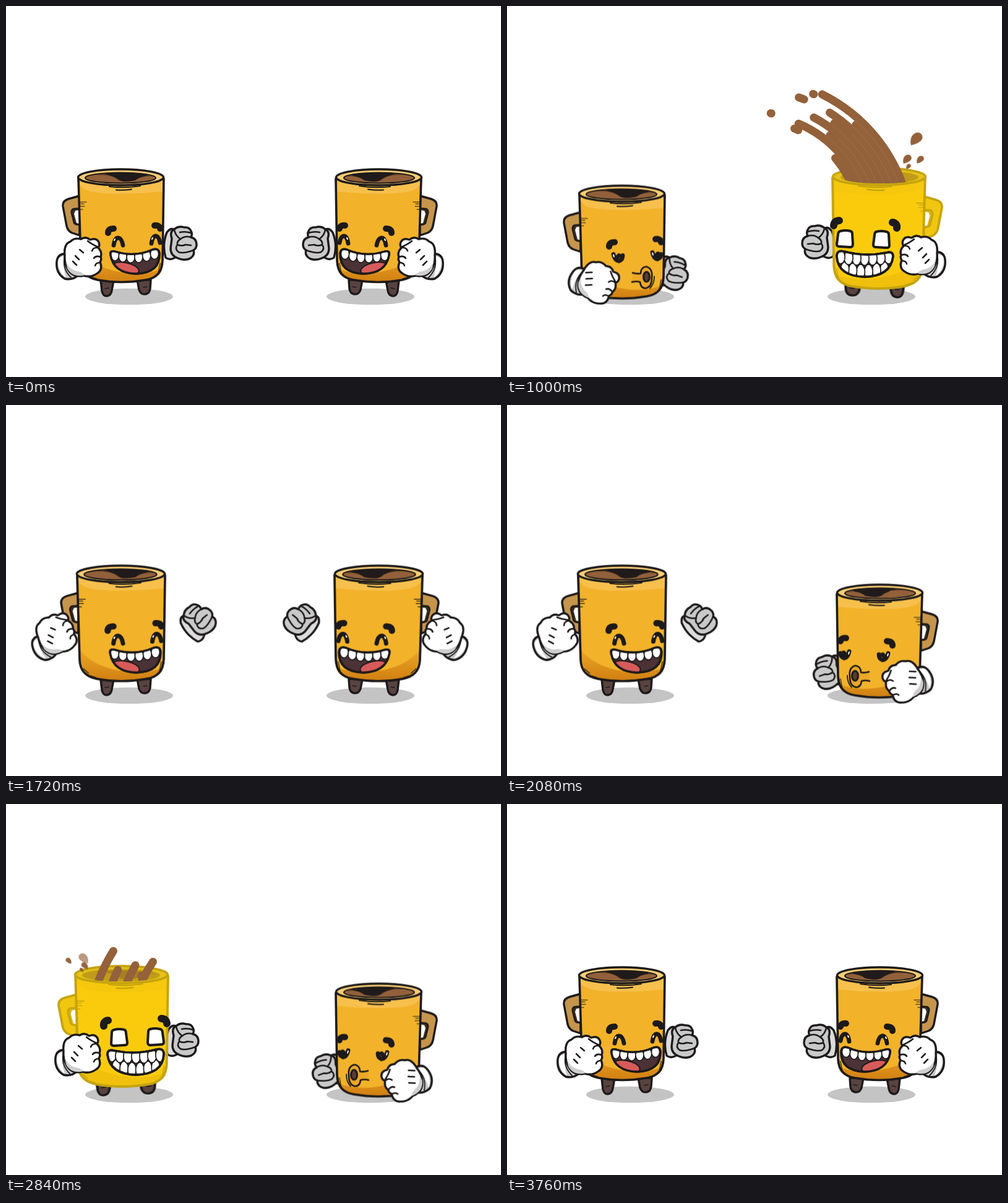
Recreate the animation shown at these times as an HTML page. Size 800 by 600 pixels, loop 3.8 s.

```html
<!DOCTYPE html>
<html lang="en">
<head>
<meta charset="utf-8">
<title>Coffee toss</title>
<style>
html, body { margin: 0; width: 100%; height: 100%; overflow: hidden; background: #fff; }
svg { display: block; width: 800px; height: 600px; }
path, ellipse { stroke-linecap: round; stroke-linejoin: round; }
g, .drop, .strand { animation: 3800ms linear infinite; }
.pose { animation-timing-function: ease-in-out; }
.flip { animation-timing-function: step-end; }
.body { transform-origin: 186px 447px; }
.front { transform-origin: 122px 407px; }
.back { transform-origin: 284px 384px; }
.legs { transform-origin: 193px 447px; }
.ink { fill: none; stroke: #1d1a1b; }
.out { stroke: #1d1a1b; stroke-width: 3.4; }
.strand { fill: none; stroke: #93613a; stroke-width: 13; }
.thin { stroke: #a37450; stroke-width: 1.2; stroke-opacity: .6; }
.drop { fill: #93613a; }
</style>
</head>
<body>
<svg id="stage" viewBox="0 0 800 600"></svg>
<script>
const LOOP = 3800, SHIFT = -2100;
const laughShape = 'M169 403Q167 395 176 397Q208 407 237 394Q247 391 248 400Q249 432 210 433Q174 432 169 403Z';
const grinShape = 'M164 405Q164 396 175 399Q210 406 243 397Q255 394 255 405Q253 437 210 438Q168 437 164 405Z';
const bodyShape = 'M117 279L121 413Q122 438 148 443Q186 450 226 443Q252 439 253 412L255 279Z';
const rules = [];

const each = (n, fn) => Array.from({ length: n }, (_, i) => fn(i)).join('');
const ink = (d, w = 2.5) => `<path class="ink" d="${d}" stroke-width="${w}"/>`;
const fill = (d, color) => `<path d="${d}" fill="${color}"/>`;
const shape = (d, color) => `<path class="out" d="${d}" fill="${color}"/>`;

// Times are in ms; the first and last values are held to the loop ends.
function key(name, frames) {
  const last = frames[frames.length - 1];
  const all = [[0, frames[0][1]], ...frames, [LOOP, last[1]]];
  rules.push(`@keyframes ${name}{${all.map(([t, css]) => `${t / LOOP * 100}%{${css}}`).join('')}}`);
}

// Switches a part to "shown" during the spans and to the reverse between them.
function flip(name, spans, shown) {
  const vis = on => `visibility:${on ? 'visible' : 'hidden'}`;
  key(name, [[0, vis(!shown)], ...spans.flatMap(([a, b]) => [[a, vis(shown)], [b, vis(!shown)]])]);
}

// body: x, y, scale x, scale y; hands: x, y, angle; legs: spread, y
const poses = {
  rest: { body: [0, 0, 1, 1],          front: [0, 0, 0],       back: [0, 0, 0],      legs: [1, 0] },
  lift: { body: [0, 0, 1.01, 1.005],   front: [-5, -5, -3],    back: [5, -3, -3],    legs: [1, 0] },
  up:   { body: [0, 0, 1.03, 1.023],   front: [-43, -35, -17], back: [28, -36, -45], legs: [1, 0] },
  kiss: { body: [0, 26.5, 1, 1],       front: [22, 39, 34],    back: [-15, 48, 14],  legs: [1, 0] },
  gulp: { body: [1, 10.5, 1.085, 1.068], front: [-2, -3, 0],   back: [3, -2, 0],     legs: [1.18, 2] }
};

const sides = {
  L: {
    track: [[0, 'rest'], [180, 'up'], [240, 'up'], [350, 'kiss'], [1440, 'kiss'], [1720, 'up'],
      [2180, 'up'], [2420, 'rest'], [2480, 'rest'], [2550, 'gulp'], [2860, 'gulp'], [2960, 'rest']],
    kiss: [310, 1500], shock: [2480, 3150], grin: [2490, 2920]
  },
  R: {
    track: [[240, 'rest'], [460, 'lift'], [620, 'lift'], [780, 'rest'], [850, 'gulp'], [1150, 'gulp'],
      [1260, 'rest'], [1460, 'rest'], [1700, 'up'], [1900, 'up'], [2040, 'kiss'], [3140, 'kiss'],
      [3360, 'up'], [3440, 'up'], [3700, 'rest']],
    kiss: [2000, 3200], shock: [790, 1460], grin: [790, 1220]
  }
};

function skin(c) {
  return `<path d="M119 307L101 312Q91 315 92 324L98 356Q100 364 107 367L119 371Z" fill="${c.tan}" stroke="${c.line}" stroke-width="3.4"/>
    <path d="M120 327L109 328Q105 330 106 335L110 351Q112 354 120 354Z" fill="${c.inner}" stroke="${c.line}" stroke-width="2.6"/>
    ${fill('M119 330L112 331L110 336L114 351L119 352Z', '#fff')}
    ${fill(bodyShape, c.body)}
    ${fill('M118 283Q118 299 150 302Q190 306 254 300L255 283Z', c.light)}
    ${fill('M122 398Q145 425 190 431Q225 436 252 425Q250 440 226 443Q186 450 148 443Q122 438 122 398Z', c.shade)}
    <path d="${bodyShape}" fill="none" stroke="${c.line}" stroke-width="3.6"/>
    <path d="M119 317h11M119 320h7M119 324h8M119 329h5M127 427l8 7M129 433l9 6M138 438l9 3M252 412l-3 16M249 416l-3 16"
      fill="none" stroke="${c.line}" stroke-width="1.2"/>
    <ellipse cx="185.5" cy="277" rx="69" ry="13" fill="${c.rim}" stroke="${c.line}" stroke-width="3.4"/>
    <ellipse cx="185" cy="278" rx="57" ry="8.5" fill="${c.coffee}"/>
    ${fill('M140 273Q155 269 185 269.5Q222 269 237 276Q220 274 207 282Q185 287 178 279Q168 272 140 273Z', c.dark)}
    ${fill('M158 272Q185 267 222 271Q236 272 226 275Q215 277 209 282Q188 287 181 280Q172 274 158 272Z', c.deep)}
    <ellipse cx="185" cy="278" rx="57" ry="8.5" fill="none" stroke="${c.line}" stroke-width="2.2"/>
    <path d="M167 292Q192 295 217 291M178 297.5Q190 298.5 203 296.5" fill="none" stroke="${c.line}" stroke-width="2"/>`;
}

const orange = { line: '#1d1a1b', body: '#f2b22a', light: '#f7c04c', shade: 'url(#dim)', rim: '#f8cd74',
  tan: '#c5954c', inner: '#3a2c22', coffee: '#92603a', dark: '#6b432a', deep: '#201b1a' };
const yellow = { line: '#c4a30f', body: '#facb0d', light: '#f5c80d', shade: '#f0c00c', rim: '#e6c21a',
  tan: '#f1c60f', inner: '#d9b310', coffee: '#c09a1c', dark: '#b08a1c', deep: '#a67f22' };

const brows = ink('M165 367Q165 360 174 360M240 355Q248 354 249 360', 10);
const glints = d => `<path d="${d}" stroke="#fff" stroke-width="2"/>`;

const laughEyes = brows + ink('M174 387Q176 374 182 375Q187 376 189 387M235 384Q237 371 243 372Q247 373 249 383', 6.8)
  + glints('M175 379l1-2M236 377l1-2');

const tooth = (x, y, rx, ry) => `<ellipse cx="${x}" cy="${y}" rx="${rx}" ry="${ry}" fill="#fff" stroke="#1d1a1b" stroke-width="1.7"/>`;

const laughMouth = shape(laughShape, '#4b3236') + `<g clip-path="url(#laugh)">
  <ellipse cx="192" cy="425" rx="23" ry="10" transform="rotate(10 192 425)" fill="#d75b5a" stroke="#1d1a1b" stroke-width="2"/>
  ${each(6, i => tooth(176 + i * 12.8, 403 + 5 * Math.sin(i * .6) - i * .6, 6.6, 9))}</g>` + ink(laughShape, 3.4);

const kissFace = `<g transform="translate(0 -4.5)">${brows}</g>`
  + ink('M172 375Q174 385 181 386Q187 384 187 377M178 380l3-3M235 372Q237 382 243 383Q249 381 249 375M241 377l3-3', 6.8)
  + glints('M172 376l1 3M235 373l1 3')
  + `<path class="ink" d="M203 405Q210 407 216 406Q216 396 225 395Q236 398 234 413Q234 428 224 430Q216 430 215 420Q209 418 202 420" style="fill:#eba829" stroke-width="2.6"/>
    <ellipse cx="225.5" cy="411.5" rx="5" ry="8" fill="#5a3b35" stroke="#1d1a1b" stroke-width="3"/>` + ink('M238 411Q238 423 231 430', 1.8);

const shockFace = ink('M158 359Q157 351 165 350M251 347Q259 347 260 355', 12)
  + `<g stroke-width="4">${ink('M175 365Q183 363 191 365Q194 366 194 371L196 386Q196 390 191 390L175 391Q170 391 170 387L171 369Q171 366 175 365ZM233 364Q241 362 249 364Q253 365 253 370L255 385Q255 389 250 389L233 390Q229 390 229 385L230 368Q230 365 233 364Z', 4).replace('/>', ' style="fill:#fff"/>')}</g>`;

const grinMouth = shape(grinShape, '#4b3236') + `<g clip-path="url(#grin)">
  ${each(6, i => tooth(178 + i * 12.8, 431 - Math.abs(i - 2.5) * 2, 6.8, 12))}
  ${each(7, i => tooth(171 + i * 13, 406 + 2.5 * Math.sin(i * .52), 7.2, 11))}</g>` + ink(grinShape, 3.8);

const backHand = shape('M260 366Q268 356 274 364L278 404Q266 413 258 407Q252 386 260 366Z', '#dcdcdc')
  + shape('M268 376Q264 365 272 361Q279 355 288 358Q297 357 300 366Q301 371 299 374Q308 376 308 386Q308 392 303 395Q306 404 296 409Q286 412 278 408Q266 404 266 392Z', '#c9c9c9')
  + ink('M272 362Q274 372 282 377M299 374Q289 371 282 377Q276 380 277 386Q284 389 290 386L299 387M277 386Q272 393 279 398Q286 401 303 395M281 366Q290 364 299 367', 2.6);

const restStitches = ink('M108 413l6 6M112 404l6 6M119 394l6 5');
const kissStitches = ink('M100 404l8-6M106 412l8-6M111 421l8-6');
const frontHand = shape('M99 401Q84 399 82 413Q80 432 95 441Q107 444 116 436L104 405Z', '#c9c9c9')
  + fill('M86 407Q82 414 86 425Q90 435 97 439Q90 421 95 404Z', '#fff')
  + ink('M95 405Q90 424 105 439', 1.8)
  + shape('M95 403Q93 385 104 381Q111 374 121 377Q129 372 136 378Q146 374 150 382Q152 388 149 391Q156 398 153 406Q155 410 152 414Q157 426 148 432Q137 440 125 436Q107 440 99 424Q94 415 95 403Z', '#fff')
  + fill('M97 413Q103 428 120 430L128 435Q107 440 99 424Z', '#cecece')
  + ink('M132 380Q138 385 149 390M149 391Q141 390 139 396M153 406Q145 403 142 408M152 415Q145 415 144 420');

const legs = shape('M153 444L155 461Q157 470 163 469Q170 468 171 460L174 444Z', '#584340')
  + shape('M212 443L215 459Q218 467 225 466Q232 465 233 457L234 443Z', '#584340')
  + ink('M160 457l6-1M222 455l6-1', 1.3);

const part = (kind, cls, name, inner) => `<g class="${kind} ${cls}" style="animation-name:${name}">${inner}</g>`;

function mug(side) {
  const s = sides[side];
  const pose = (name, inner, css) => {
    key(name + side, s.track.map(([t, p]) => [t, `transform:${css(poses[p][name])}`]));
    return part('pose', name, name + side, inner);
  };
  const turn = ([x, y, a]) => `translate(${x}px,${y}px) rotate(${a}deg)`;
  const stretch = ([x, y, sx, sy]) => `translate(${x}px,${y}px) scale(${sx},${sy})`;
  const spread = ([sx, y]) => `translate(0px,${y}px) scale(${sx},1)`;

  const show = (name, inner) => part('flip', '', name + side, inner);
  for (const name of ['kiss', 'shock', 'grin']) flip(name + side, [s[name]], true);
  for (const name of ['kiss', 'grin']) flip('no' + name + side, [s[name]], false);
  const inOrder = (...spans) => spans.sort((a, b) => a[0] - b[0]);
  flip('eyes' + side, inOrder(s.kiss, s.shock), false);
  flip('mouth' + side, inOrder(s.kiss, s.grin), false);

  return '<ellipse cx="199" cy="470" rx="71" ry="13.3" fill="#c4c4c4"/>'
    + pose('legs', legs, spread)
    + pose('back', backHand, turn)
    + pose('body', show('nogrin', skin(orange)) + show('grin', skin(yellow))
      + show('eyes', laughEyes) + show('mouth', laughMouth) + show('kiss', kissFace), stretch)
    + show('shock', shockFace) + show('grin', grinMouth)
    + pose('front', frontHand + show('nokiss', restStitches) + show('kiss', kissStitches), turn);
}

// f runs from the outer arc (0) to the inner one (1).
const arc = f => `M${139 + 80 * f} 322C${170 + 72 * f} ${185 + 50 * f} ${290 + 20 * f} ${115 + 70 * f} 394 ${115 + 70 * f}`
  + `S${618 - 72 * f} ${185 + 50 * f} ${649 - 80 * f} 322`;

// Even strands pour to the end, odd ones rush ahead and stop early.
function stream(delay) {
  const strand = (f, lead, name, cls = '') =>
    `<path class="strand ${cls}" pathLength="100" d="${arc(f)}" style="animation-name:${name};animation-delay:${delay - lead - LOOP}ms"/>`;
  const leads = [40, 25, 68, 3, 50, 12, 30, 50];
  return `<g clip-path="url(#air)">${leads.map((lead, i) => strand(i / 7, lead, i % 2 ? 'rush' : 'pour')).join('')}
    ${each(6, i => strand((i + .5) / 7, leads[i] / 2, 'rush', 'thin'))}
    ${strand(.08, 10, 'bead')}${strand(.28, 0, 'blob')}${strand(.8, -35, 'bead')}${strand(1, 10, 'blob')}</g>`;
}

// A dash from "tail" to "tail + len", in percent of the arc.
const dash = (tail, len) => `stroke-dasharray:0 ${tail} ${len} 400`;
key('pour', [[440, dash(0, 0)], [595, dash(0, 43)], [800, dash(32, 68)], [1270, dash(100, 0)]]);
key('rush', [[440, dash(0, 0)], [595, dash(0, 43)], [790, dash(35, 65)], [1150, dash(100, 0)]]);
for (const [name, len] of [['bead', .2], ['blob', 1.4]]) {
  key(name, [[639, dash(0, len) + ';opacity:0'], [640, dash(0, len) + ';opacity:1'],
    [1000, dash(62, len) + ';opacity:1'], [1139, dash(100, len) + ';opacity:1'], [1140, dash(100, len) + ';opacity:0']]);
}

// Splash drops: peak x, y, scale, then landing x, y and the time they vanish.
const drops = [[126, 214, 1, 125, 249, 1200], [141, 247, .7, 127, 261, 1180], [120, 248, .6, 101, 253, 1200], [139, 259, .4, 122, 268, 1430]];
drops.forEach(([x, y, s, ex, ey, end], i) => {
  const at = (px, py, k, o) => `transform:translate(${px}px,${py}px) scale(${k});opacity:${o}`;
  key('splash' + i, [[859, at(140, 276, s * .5, 0)], [860, at(140, 276, s * .5, 1)], [1000, at(x, y, s, 1)],
    [1140, at(ex, ey, s * .8, i ? 1 : .65)], [end, at(ex - 3, ey + 8, s * .6, 0)]]);
});
const splash = delay => drops.map((_, i) =>
  `<path class="drop" d="M-5-9Q-11-6-9 1Q-5 8 9 11Q12 0 5-7Q0-11-5-9Z" style="animation-name:splash${i};animation-delay:${delay}ms"/>`).join('');

const mirror = inner => `<g transform="matrix(-1 0 0 1 788 0)">${inner}</g>`;
document.getElementById('stage').innerHTML = `<defs>
    <linearGradient id="dim" gradientUnits="userSpaceOnUse" x1="0" y1="398" x2="0" y2="446">
      <stop stop-color="#eba626"/><stop offset="1" stop-color="#d18012"/></linearGradient>
    <clipPath id="laugh"><path d="${laughShape}"/></clipPath>
    <clipPath id="grin"><path d="${grinShape}"/></clipPath>
    <clipPath id="air"><path d="M0 0H800V279H664A60 8 0 0 1 544 279H400V304H245A60 8 0 0 1 125 304H0Z"/></clipPath>
  </defs>`
  + mug('L') + mirror(mug('R'))
  + stream(0) + mirror(stream(SHIFT))
  + splash(SHIFT) + mirror(splash(0));

const style = document.createElement('style');
style.textContent = rules.join('\n');
document.head.append(style);
</script>
</body>
</html>
```
